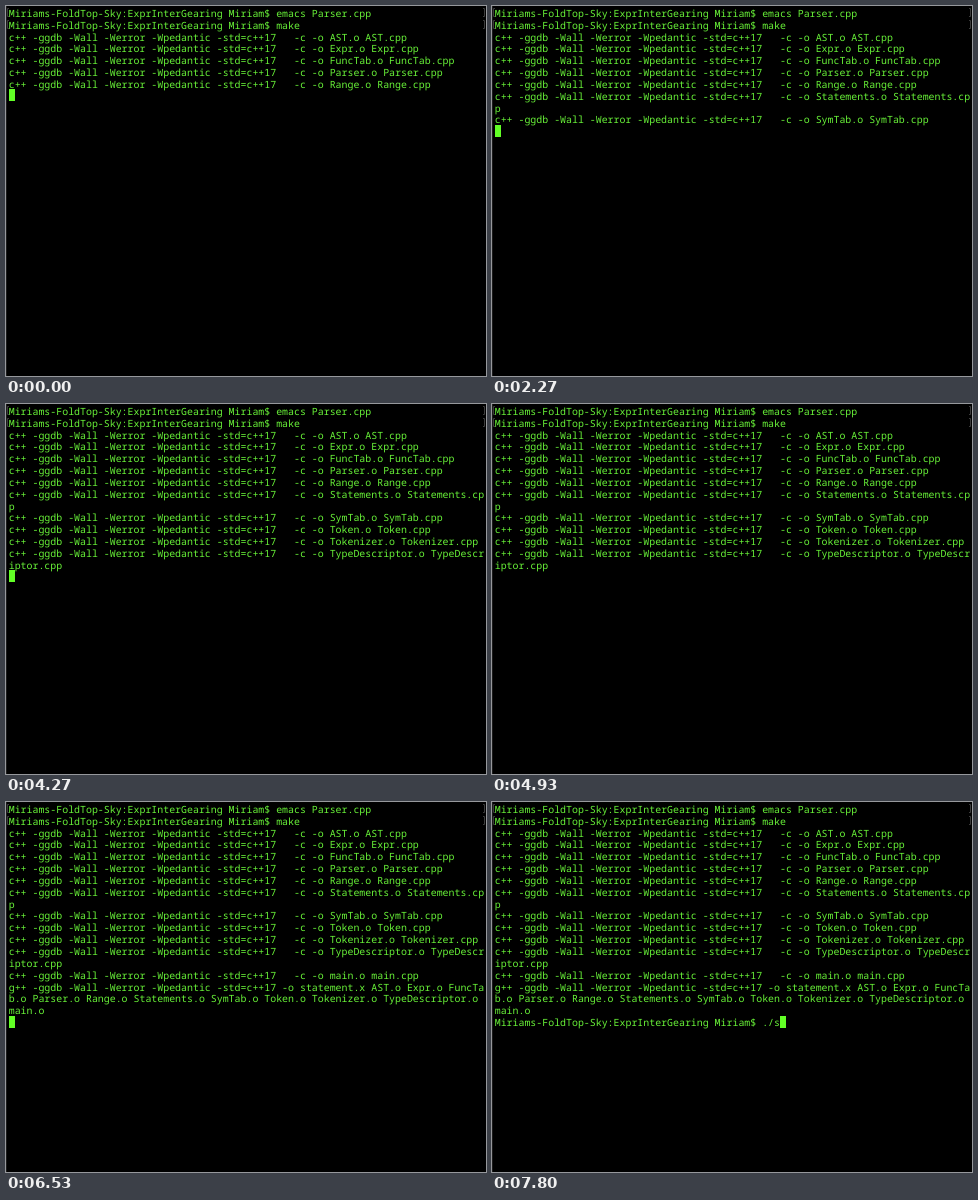
An HTML page that plays this animation: 480x370 px, repeating every 8 s.

```html
<!DOCTYPE html>
<html lang="en">
<head>
<meta charset="utf-8">
<title>Terminal build</title>
<style>
  html, body { margin: 0; width: 100%; height: 100%; overflow: hidden; background: #000; }
  svg { display: block; width: 100%; height: 100%; }
  text {
    white-space: pre; fill: #68f238;
    font: 9.913px "Noto Sans Mono", "DejaVu Sans Mono", monospace;
    text-rendering: geometricPrecision; font-variant-ligatures: none;
  }
  #cursor { fill: #62ff26; }
  #marks { fill: none; stroke: #3c3c3c; }
  #edge { fill: #1c1c1c; }
</style>
</head>
<body>
<svg viewBox="0 0 480 370">
  <rect id="edge" width="1" height="370"/>
  <path id="marks" d="M3 2.5H1.5V10.5H3M477 2.5H478.5V10.5H477M3 14.5H1.5V22.5H3M477 14.5H478.5V22.5H477"/>
  <rect id="cursor" width="6" height="12"/>
  <g id="log"></g>
</svg>
<script>
const LOOP = 8000, COLS = 80, LEFT = 2.7, CELL_W = 5.948, CELL_H = 11.84, BASELINE = 10.9;
const log = document.getElementById('log');
const cursor = document.getElementById('cursor');

const prompt = 'Miriams-FoldTop-Sky:ExprInterGearing Miriam$ ';
const flags = '-ggdb -Wall -Werror -Wpedantic -std=c++17';
const compile = name => `c++ ${flags}   -c -o ${name}.o ${name}.cpp\n`;
const units = ['AST', 'Expr', 'FuncTab', 'Parser', 'Range', 'Statements',
  'SymTab', 'Token', 'Tokenizer', 'TypeDescriptor', 'main'];
const link = `g++ ${flags} -o statement.x ${units.map(u => u + '.o').join(' ')}\n`;

// Output chunks with the time each one is printed
const output = [
  [0, `${prompt}emacs Parser.cpp\n${prompt}make\n` + units.slice(0, 5).map(compile).join('')],
  ...[530, 1800, 2800, 3270, 4200, 5400].map((time, i) => [time, compile(units[i + 5])]),
  [6530, link],
  [6670, prompt],
  [7270, '.'], [7470, '/'], [7800, 's']
];
const cursorOff = [[3930, 4200], [4930, 5400]];

const wrap = line => line.match(new RegExp(`.{1,${COLS}}`, 'g')) || [''];
let shown = '';

function show(rows) {
  log.replaceChildren(...rows.map((row, i) => {
    const line = document.createElementNS('http://www.w3.org/2000/svg', 'text');
    line.setAttribute('x', LEFT);
    line.setAttribute('y', BASELINE + i * CELL_H);
    line.textContent = row;
    return line;
  }));
  cursor.setAttribute('x', Math.round(LEFT + rows.at(-1).length * CELL_W));
  cursor.setAttribute('y', Math.round(.4 + (rows.length - 1) * CELL_H));
}

function draw(time) {
  const printed = output.filter(([at]) => at <= time).map(([, chunk]) => chunk).join('');
  if (printed !== shown) show(printed.split('\n').flatMap(wrap));
  shown = printed;
  const off = cursorOff.some(([from, to]) => time >= from && time < to);
  cursor.setAttribute('visibility', off ? 'hidden' : 'visible');
}

const start = performance.now();
function tick() {
  draw((performance.now() - start) % LOOP);
  requestAnimationFrame(tick);
}
draw(0);
requestAnimationFrame(tick);
</script>
</body>
</html>
```
